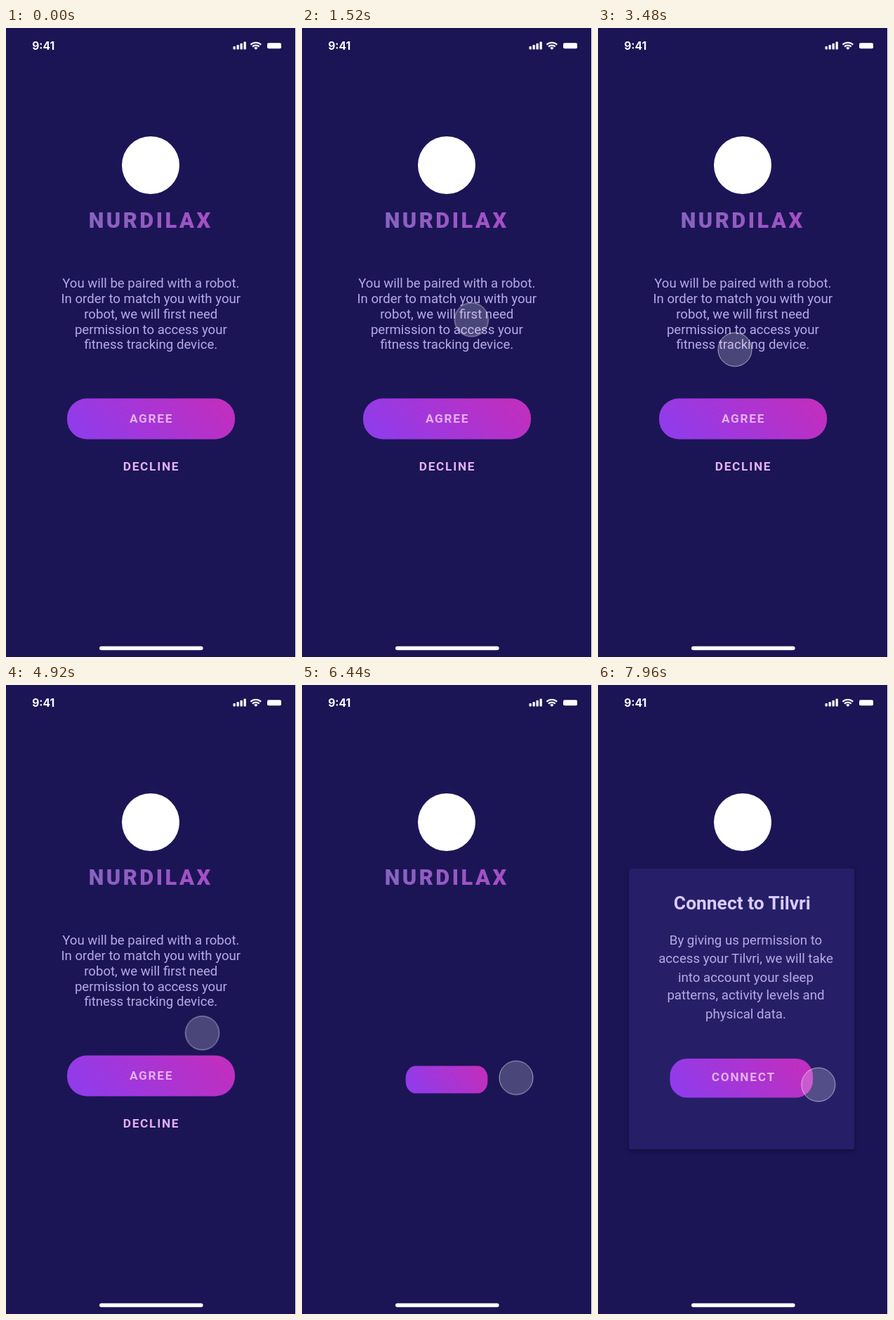
Animation, 413 px wide and 894 px high, one loop 8000 ms. Source, as an HTML page:

```html
<!DOCTYPE html>
<html lang="en">
<head>
<meta charset="utf-8">
<title>Pairing screen</title>
<style>
  html, body { margin: 0; width: 100%; height: 100%; overflow: hidden; background: #1b1556; }
  svg { display: block; width: 413px; height: 894px; font-family: Roboto, sans-serif; text-anchor: middle; }

  .time { font: 700 15.6px Inter, sans-serif; fill: #fff; }
  .brand { font-size: 30.8px; font-weight: 900; letter-spacing: 3.5px; fill: url(#brandFill); }
  .copy { font-size: 18.7px; fill: #b7a9e3; }
  .intro { font-size: 18.6px; }
  .heading { font-size: 26.4px; font-weight: 700; fill: #d9cbff; }
  .label { font-size: 17.3px; font-weight: 600; letter-spacing: 1.7px; fill: #e3b0ec; }
  .panel { fill: #261f68; filter: drop-shadow(0 3px 3px rgba(0, 0, 0, .28)); }
  .button { fill: url(#buttonFill); transform-box: fill-box; transform-origin: center; }
  .cursor { fill: rgba(255, 255, 255, .21); stroke: rgba(255, 255, 255, .58); }

  .anim { animation: 8s linear infinite both; }
  .agree { animation-name: shrink; }
  .agree-label { animation-name: agreeOut; }
  .decline { animation-name: declineOut; }
  .intro { animation-name: introOut; }
  .brand { animation-name: brandOut; }
  .connect { animation-name: grow; }
  .connect-label { animation-name: connectIn; }
  .card { animation-name: cardIn; }
  .heading { animation-name: headingRise; }
  .details { animation-name: detailsRise; }
  .cursor { animation-name: wander; }

  @keyframes shrink {
    0%, 71.5% { transform: none; ry: 28px; }
    75.25%, 100% { transform: translate(1.8px, 8.5px) scale(0, .3); ry: 16px; }
  }
  @keyframes grow {
    0%, 78.5% { transform: translate(4px, 5px) scale(0, .3); animation-timing-function: ease-out; }
    83.5%, 100% { transform: none; }
  }
  @keyframes agreeOut { 0%, 71.5% { opacity: 1; } 75.25%, 100% { opacity: 0; } }
  @keyframes declineOut { 0%, 71.5% { opacity: 1; } 74%, 100% { opacity: 0; } }
  @keyframes introOut { 0%, 75% { opacity: 1; } 79%, 100% { opacity: 0; } }
  @keyframes brandOut { 0%, 82% { opacity: 1; } 85%, 100% { opacity: 0; } }
  @keyframes cardIn { 0%, 83.75% { opacity: 0; } 88.5%, 100% { opacity: 1; } }
  @keyframes connectIn { 0%, 84.7% { opacity: 0; } 88.5%, 100% { opacity: 1; } }
  @keyframes headingRise { 0%, 83.75% { transform: translateY(4px); } 88.5%, 100% { transform: none; } }
  @keyframes detailsRise { 0%, 83.75% { transform: translateY(2px); } 88.5%, 100% { transform: none; } }

  @keyframes wander {
    0%, 9.45% { opacity: 0; transform: translate(378px, -10px); }
    9.5% { opacity: 1; transform: translate(378px, -6px); }
    12% { transform: translate(380px, 72px); }
    15% { transform: translate(368px, 216px); }
    17% { transform: translate(339px, 326px); }
    18.2% { transform: translate(300px, 389px); }
    19% { transform: translate(242.5px, 414.5px); }
    19.5% { transform: translate(197px, 416px); }
    20% { transform: translate(165px, 414px); }
    21%, 28.5% { transform: translate(139px, 408px); }
    31% { transform: translate(151px, 403px); }
    34% { transform: translate(205px, 406px); }
    37% { transform: translate(255px, 415px); }
    39%, 39.5% { transform: translate(268.5px, 417.5px); }
    41.5% { transform: translate(228px, 439px); }
    43.5%, 45.5% { transform: translate(195px, 457px); }
    48% { transform: translate(229px, 464px); }
    51% { transform: translate(270px, 482px); }
    53%, 55% { transform: translate(281.5px, 489px); }
    55.5%, 61% { transform: translate(279px, 488.7px); }
    61.5% { transform: translate(279.5px, 494.5px); }
    65% { transform: translate(289px, 527px); }
    68% { transform: translate(300px, 549px); }
    70.5%, 97% { opacity: 1; transform: translate(305px, 558.3px); }
    99.5%, 100% { opacity: 1; transform: translate(313.8px, 568px); }
  }
</style>
</head>
<body>
<svg viewBox="0 0 413 894">
  <defs>
    <linearGradient id="brandFill">
      <stop stop-color="#8664bf"/><stop offset="1" stop-color="#a64ec5"/>
    </linearGradient>
    <linearGradient id="buttonFill" x1="0" y1=".62" x2="1" y2=".38">
      <stop offset=".05" stop-color="#923be9"/><stop offset=".96" stop-color="#bf2fc0"/>
    </linearGradient>
  </defs>
  <rect width="413" height="894" fill="#1b1556"/>

  <!-- status bar and home indicator -->
  <text class="time" x="53.2" y="30.5">9:41</text>
  <g fill="#fff">
    <rect x="323.5" y="26" width="3.3" height="4.5" rx="1"/>
    <rect x="328.5" y="24" width="3.3" height="6.5" rx="1"/>
    <rect x="333.5" y="21.8" width="3.3" height="8.7" rx="1"/>
    <rect x="338.5" y="19.5" width="3.3" height="11" rx="1"/>
    <path d="M355.8 31l-2.7-2.8a4 4 0 0 1 5.4 0z"/>
    <rect x="372" y="21.2" width="20" height="8" rx="2"/>
    <rect x="133" y="878.8" width="147.6" height="5.5" rx="2.75"/>
  </g>
  <g fill="none" stroke="#fff" stroke-width="2.1">
    <path d="M348.4 23.7a10.6 10.6 0 0 1 14.8 0M350.9 26.6a7 7 0 0 1 9.8 0"/>
  </g>

  <circle cx="206" cy="195" r="41" fill="#fff"/>
  <text class="brand anim" x="206.2" y="284.3">NURDILAX</text>

  <g class="copy intro anim">
    <text x="206.3" y="369.2">You will be paired with a robot.</text>
    <text x="206.3" y="391">In order to match you with your</text>
    <text x="206.3" y="412.8">robot, we will first need</text>
    <text x="206.3" y="434.6">permission to access your</text>
    <text x="206.3" y="456.2">fitness tracking device.</text>
  </g>
  <rect class="button agree anim" x="87" y="526.5" width="239" height="58" rx="28"/>
  <text class="label agree-label anim" x="207" y="561.3">AGREE</text>
  <text class="label decline anim" x="207" y="629.3">DECLINE</text>

  <g class="card anim">
    <rect class="panel" x="44" y="261" width="321" height="399" rx="4"/>
    <text class="heading anim" x="205.3" y="319.3">Connect to Tilvri</text>
    <g class="copy details anim">
      <text x="210.5" y="369.3">By giving us permission to</text>
      <text x="210.5" y="395.4">access your Tilvri, we will take</text>
      <text x="210.5" y="421.5">into account your sleep</text>
      <text x="210.5" y="447.4">patterns, activity levels and</text>
      <text x="210.5" y="473.5">physical data.</text>
    </g>
  </g>
  <rect class="button connect anim" x="102.5" y="531" width="203.5" height="55.5" rx="24.5"/>
  <text class="label connect-label anim" x="207.3" y="562.8">CONNECT</text>

  <circle class="cursor anim" r="24"/>
  <rect x="412" width="1" height="894" fill="#fff"/>
</svg>
</body>
</html>
```
